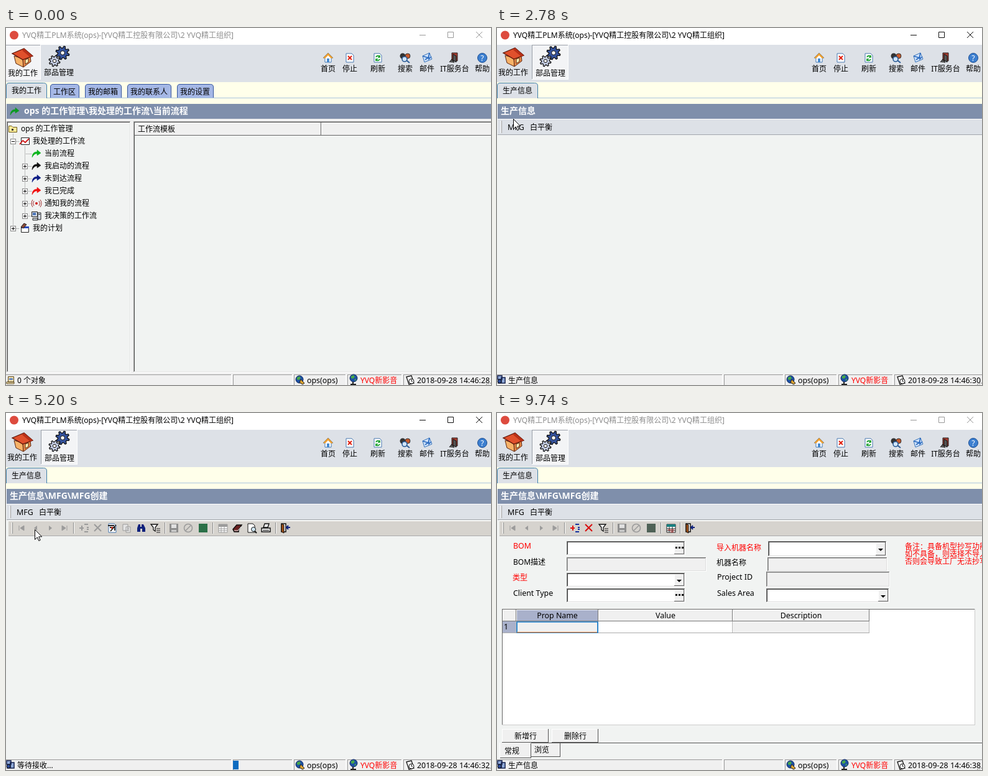
Write an HTML page with a canvas that moves like this. It is 780 px wide and 574 px high and loops after 9.89 s.

```html
<!DOCTYPE html>
<html lang="zh-CN">
<head>
<meta charset="utf-8">
<title>PLM</title>
<style>
html, body { margin: 0; width: 100%; height: 100%; overflow: hidden; background: #fff; }
canvas { display: block; }
</style>
</head>
<body>
<canvas id="stage" width="780" height="574"></canvas>
<script>
const g = document.getElementById('stage').getContext('2d');
const LOOP = 9890, BAR = '#dde1e7', BODY = '#f1f3f2', FACE = '#f0f0f0', RED = '#f00';
const FONT = '"Noto Sans","Noto Sans CJK SC","Noto Sans CJK",sans-serif';

// start, end, steps, from x, y, to x, y
const MOVES = [
  [140, 1070, 13, 632, 568, 79, 72],
  [2390, 2780, 6, 79, 72, 26, 146],
  [2860, 3010, 3, 26, 146, 26, 159],
  [4100, 4480, 6, 26, 159, 46, 187],
  [5720, 5970, 4, 46, 187, 48, 220],
  [6050, 6510, 7, 48, 220, 138, 220],
  [8470, 9420, 13, 138, 220, 656, 580]
];

function rect(x, y, w, h, c) { g.fillStyle = c; g.fillRect(x, y, w, h); }

function bevel(x, y, w, h, tl, br) {
  rect(x, y, w, 1, tl); rect(x, y, 1, h, tl);
  rect(x, y + h - 1, w, 1, br); rect(x + w - 1, y, 1, h, br);
}

function sunk(x, y, w, h) {
  rect(x, y, w, h, BODY);
  bevel(x, y, w, h, '#a0a0a0', '#fff');
  bevel(x + 1, y + 1, w - 2, h - 2, '#555', '#e3e3e3');
}

function text(s, x, y, c = '#000', align = 'left', bold = false) {
  const size = bold ? 14 : /[\u4e00-\u9fff]/.test(s) ? 12 : 12.4;
  g.font = (bold ? 'bold ' : '') + size + 'px ' + FONT;
  g.textAlign = align;
  g.fillStyle = c;
  g.fillText(s, x, y + 5);
}

function path(d, x, y, fill, stroke, lw = 1) {
  const p = new Path2D(d);
  g.save();
  g.translate(x, y);
  if (fill) { g.fillStyle = fill; g.fill(p); }
  if (stroke) { g.strokeStyle = stroke; g.lineWidth = lw; g.stroke(p); }
  g.restore();
}

function disc(x, y, r, fill, stroke, lw = 1) {
  g.beginPath(); g.arc(x, y, r, 0, 7);
  if (fill) { g.fillStyle = fill; g.fill(); }
  if (stroke) { g.strokeStyle = stroke; g.lineWidth = lw; g.stroke(); }
}

function gear(x, y, r, c) {
  g.beginPath();
  for (let i = 0; i < 32; i++) {
    const a = i * Math.PI / 16 + .2, q = i % 4 < 2 ? r : r * .7;
    g.lineTo(x + q * Math.cos(a), y + q * Math.sin(a));
  }
  g.closePath();
  g.fillStyle = c; g.fill();
  g.strokeStyle = '#111'; g.lineWidth = 1.3; g.stroke();
  disc(x, y, r * .3, '#fff', '#111');
}

function page(x, y) { path('M-6-7H3L6-4V7H-6Z', x, y, '#fff', '#4878b0'); }

function titleBar(active) {
  rect(0, 0, 780, 27, '#fff');
  disc(13, 11.5, 7, '#dd4b3e');
  text('YVQ精工PLM系统(ops)-[YVQ精工控股有限公司\\2 YVQ精工组织]', 26, 11, active ? '#000' : '#8c8c8c');
  const c = active ? '#111' : '#999';
  rect(665, 11, 10, 1, c);
  path('M.5.5h9v9h-9Z', 710, 6, null, c);
  path('M0 0L10 10M10 0L0 10', 756, 6, null, c);
}

function bigButton(x, w, on) {
  if (!on) return;
  rect(x, 27, w, 56, on === 2 ? '#f3f4f6' : '#d5d9df');
  bevel(x, 27, w, 56, '#9a9fa8', '#fff');
}

function house(x, y) {
  path('M3 12L17 16L18 30L6 24Z', x, y, '#f6b268', '#5a2410');
  path('M17 16L29 12L30 21L18 30Z', x, y, '#e88a48', '#5a2410');
  path('M0 8L19 0L33 12L17 18Z', x, y, '#e0502c', '#5a1408', 1.3);
  path('M19 0L33 12L29 14L16 3Z', x, y, '#b83018');
  path('M21 18L26 16V22L21 25Z', x, y, '#fff0b0', '#5a2410');
}

function mainBar(t) {
  const parts = t >= 1530;
  rect(0, 27, 780, 60, BAR);
  bigButton(-1, 57, parts ? 0 : 2);
  bigButton(56, 59, parts ? 2 : t >= 1000 ? 1 : 0);
  const d = parts ? 0 : 1;
  house(10, 32 + d);
  text('我的工作', 2 + d, 71 + d);
  gear(91, 40, 11, '#34529c');
  gear(78, 53, 9, '#c4cde4');
  text('部品管理', 61 + (t >= 1000), 71 + (parts || t >= 1000));

  path('M-8 0L0-8L8 0L5 0V7H-5V0Z', 518, 48, '#fff', '#3d77b4');
  path('M-8 0L0-8L8 0L5 1L0-4L-5 1Z', 518, 48, '#f0a030');
  rect(516, 49, 4, 6, '#4a8cd0');
  page(553, 48); path('M-3-2L3 4M3-2L-3 4', 553, 47, null, '#e02010', 2);
  page(598, 48); path('M-3-1C-2-4 2-4 3-2M3 2C2 5-2 5-3 3M3-4V-1H0M-3 5V2H0', 598, 48, null, '#0a9a20', 1.6);
  disc(638, 45, 4.5, '#333'); disc(646, 45, 4, '#c75a2c', '#333');
  disc(641, 50, 4, '#cfe4fa', '#2a5a94', 1.6); path('M0 0L5 4', 644, 52, null, '#2a5a94', 2);
  path('M-7-3L4-8L8 2L-4 7Z', 677, 48, '#cfe2fa', '#3772b8');
  path('M-7-3L2 0L4-8M-3 3L3-1V2L7-2', 677, 48, null, '#2768be', 1.6);
  path('M-4-8H5V5H-4Z', 721, 48, '#a63a2e', '#222');
  path('M-2-6L3-3V7L-2 4ZM-8 7L-4 2L0 8', 721, 48, '#555', '#111');
  disc(766, 48, 7.5, '#3c7fd0', '#1e4f92'); text('?', 766, 48, '#fff', 'center');
  [['首页', 518], ['停止', 553], ['刷新', 598], ['搜索', 642], ['邮件', 677], ['IT服务台', 721.5], ['帮助', 766]]
    .forEach(([s, x]) => text(s, x, 65, '#000', 'center'));
}

function tab(x, w, s, on) {
  const y = on ? 88 : 90, h = 113 - y, r = w - .5;
  path(`M.5 ${h} V5 Q.5 .5 5 .5 H${r - 5} Q${r} .5 ${r} 5 V${h}`, x, y, on ? BAR : '#a5b8e6', on ? '#3f7fa8' : '#34549c');
  text(s, x + Math.floor(w / 2), on ? 100 : 102, '#000', 'center');
}

function tabs(list) {
  rect(0, 87, 780, 35, '#ffffea');
  list.forEach(([x, w, s], i) => { if (i) tab(x, w, s); });
  rect(0, 112, 780, 1, '#a9c4de');
  tab(0, 66, list[0][2], true);
  rect(1, 112, 64, 1, BAR);
}

function heading(s, x) {
  rect(0, 122, 780, 24, '#7f8fab');
  rect(0, 122, 1, 24, '#fff');
  text(s, x, 133, '#fff', 'left', true);
}

function arrow(x, y, c) {
  path('M0 12C0 6 3 3 8 3V0L14 5L8 9V6C5 6 3 7 0 12Z', x, y, c, c, .5);
}

function expander(x, y, plus) {
  rect(x - 4, y - 4, 9, 9, '#fff');
  bevel(x - 4, y - 4, 9, 9, '#888', '#888');
  rect(x - 2, y, 5, 1, '#000');
  if (plus) rect(x, y - 2, 1, 5, '#000');
}

function dots(x, y, w, h) {
  for (let i = 0; i < Math.max(w, h); i += 2) rect(w ? x + i : x, h ? y + i : y, 1, 1, '#888');
}

function workView(t) {
  tabs([[0, 66, '我的工作'], [71, 47, '工作区'], [127, 59, '我的邮箱'], [195, 71, '我的联系人'], [275, 59, '我的设置']]);
  heading('ops 的工作管理\\我处理的工作流\\当前流程', 29);
  arrow(7, 128, '#0a9a20');
  rect(0, 146, 780, 411, FACE);
  sunk(1, 150, 200, 404);
  sunk(205, 150, 580, 404);
  rect(207, 152, 573, 21, FACE);
  bevel(207, 152, 300, 21, '#fff', '#666'); bevel(507, 152, 280, 21, '#fff', '#666');
  text('工作流模板', 212, 162);

  dots(11, 170, 0, 152); dots(30, 190, 0, 112);
  [182, 322].forEach(y => dots(12, y, 10, 0));
  for (let y = 202; y < 303; y += 20) dots(32, y, 9, 0);
  expander(11, 182, false); expander(11, 322, true);
  for (let y = 222; y < 303; y += 20) expander(30, y, true);
  path('M.5 2.5H5l2 2h6.500v8h-13Z', 4, 155, '#ffec9a', '#6c5a14');
  rect(9, 162, 3, 3, '#333');
  path('M2.5.5h13v11h-13Z', 22, 176, '#fff', '#222');
  path('M0 11L5 5L9 8L15 2', 22, 176, null, '#d01818', 1.8);
  ['#0ab41c', '#111', '#0b1c84', '#f01010'].forEach((c, i) => arrow(42, 196 + i * 20, c));
  disc(49, 282, 2, '#d01818');
  path('M-4-4Q-7 0-4 4M4-4Q7 0 4 4M-6-6Q-10 0-6 6M6-6Q10 0 6 6', 49, 282, null, '#a03030');
  path('M.5.5h9v8h-9ZM2 11h8v3H2ZM10 2h5v11h-5Z', 41, 295, '#d4dce8', '#222');
  rect(43, 297, 5, 4, '#4a74b8'); rect(52, 299, 3, 1, '#222');
  path('M2.500 5.500h12v9h-12Z', 22, 314, '#fff', '#222');
  rect(25, 319, 12, 3, '#2a4cc0');
  path('M0 6L5 0L9 2L4 8Z', 24, 314, '#8a4a38', '#222');

  const on = t >= 1300;
  if (on) {
    rect(60, 192, 52, 20, '#0078d7');
    g.setLineDash([1, 1]); path('M.5.5h51v19h-51Z', 60, 192, null, '#f0a060'); g.setLineDash([]);
  }
  text('ops 的工作管理', 24, 161);
  text('我处理的工作流', 43, 181);
  ['当前流程', '我启动的流程', '未到达流程', '我已完成', '通知我的流程', '我决策的工作流']
    .forEach((s, i) => text(s, 62, 201 + i * 20, on && !i ? '#fff' : '#000'));
  text('我的计划', 43, 321);
}

function grip(y, h) { rect(6, y, 1, h, '#fff'); rect(7, y, 1, h, '#9a9a9a'); }

function partsView(t) {
  tabs([[0, 66, '生产信息']]);
  heading(t >= 5030 ? '生产信息\\MFG\\MFG创建' : '生产信息', 6);
  rect(0, 146, 780, 411, BODY);
  rect(1, 146, 779, 26, BAR); rect(1, 171, 779, 1, '#a2a6ac'); rect(1, 146, 779, 1, '#fff');
  grip(149, 20);
  const open = t >= 3400 && t < 5030, hover = t >= 2860 && t < 5030;
  if (hover) bevel(12, 147, 36, 24, open ? '#888' : '#fff', open ? '#fff' : '#888');
  text('MFG', 17 + open, 159 + open);
  text('白平衡', 53, 159);
  if (t >= 5190) tools(t >= 6200);
  if (t >= 5340) form(t);
}

function menu(hot) {
  g.save();
  g.shadowColor = 'rgba(0,0,0,.55)'; g.shadowBlur = 4; g.shadowOffsetX = g.shadowOffsetY = 3;
  rect(12, 172, 159, 49, '#f2f2f2');
  g.restore();
  bevel(12, 172, 159, 49, '#ccc', '#ccc');
  if (hot) rect(15, 174, 153, 22, '#91c9f7');
  text('MFG创建(M)', 47, 185);
  text('MFG修改(I)', 47, 207);
}

const GREY = '#9b9b9b';
const ICONS = {
  first: x => path('M-4-4V4M4-4V4L-2 0Z', x, 185, GREY, GREY),
  prev: x => path('M2-4V4L-3 0Z', x, 185, GREY),
  next: x => path('M-2-4V4L3 0Z', x, 185, GREY),
  last: x => path('M4-4V4M-4-4V4L2 0Z', x, 185, GREY, GREY),
  add(x, on) {
    path('M-7 0H0M-3-4V4', x, 185, null, on ? '#e01010' : GREY, 2);
    path('M1-6H7M1 6H7M5-1H8M5 2H8', x, 185, null, on ? '#1530a0' : GREY, 2);
  },
  del: (x, on) => path('M-5-5L6 6M6-5L-5 6', x, 184, null, on ? '#d80c0c' : GREY, 2),
  edit(x) { page(x, 185); path('M-7-4H3M-3 5L6-5M-4-1H4V4', x, 185, null, '#222', 1.8); rect(x - 2, 183, 3, 3, '#c03020'); },
  copy: x => path('M-6-6H2V4H-6ZM-1-2H6V7H-1ZM1 1H4M1 4H4', x, 185, '#e4e4e4', GREY),
  find: x => path('M-6 6V0L-4-6H-1V-2H1V-6H4L7 0V6H2V1H-1V6Z', x, 185, '#10227c'),
  filter(x) { path('M-7-6H4L0-1V5L-3 3V-1Z', x, 185, '#fff', '#111', 1.3); path('M2 1H8M2 4H8M2 7H8', x, 185, null, '#222', 1.2); },
  save(x) { rect(x - 7, 178, 14, 14, '#8e8e8e'); rect(x - 4, 179, 8, 6, '#e0e0e0'); rect(x - 4, 188, 8, 3, '#ccc'); },
  stop(x) { disc(x, 185, 6.5, null, GREY, 1.6); path('M-4 4L4-4', x, 185, null, GREY, 1.6); },
  sheet: (x, on) => rect(x - 7, 178, 14, 14, on ? '#4f6257' : '#2b7048'),
  table(x, on) {
    path('M-7-6H7V7H-7ZM-7 1H7M-7 4H7M-3-2V7M2-2V7', x, 185, '#fff', on ? '#222' : GREY);
    rect(x - 7, 179, 14, 4, on ? '#188080' : GREY);
    if (on) path('M-5 3H5M-1 6H4', x, 185, null, '#d02020');
  },
  book(x) { path('M-7 2L-1-5H7L2 3V6H-5Z', x, 185, '#6a2020', '#111', 1.5); path('M-5 4H1L6-2', x, 185, null, '#fff'); },
  view(x) { path('M-6-7H2L5-4V7H-6Z', x, 185, '#fff', '#111'); disc(x + 3, 187, 3.5, '#cfe6f4', '#111'); path('M0 0L3 3', x + 5, 190, null, '#111', 2); },
  print(x) { path('M-4-1L-2-7H5L3-1ZM-7 0H7V6H-7Z', x, 185, '#eee', '#111', 1.4); rect(x - 5, 188, 10, 1, '#111'); },
  exit(x) { path('M-6-7H1V6H-6Z', x, 185, '#fff', '#111', 1.5); path('M-6-7L-2-5V8L-6 6Z', x, 185, '#a05018', '#111'); path('M8-1H3M5-4L2-1L5 2', x, 185, null, '#10227c', 2); }
};
const NAV = 'first:25 prev:48 next:71 last:94 -:108 add:125 del:147 ';
const BUSY = NAV + 'edit:171 copy:194 find:217 filter:240 -:255 save:270 stop:293 sheet:317 -:332 table:349 book:372 view:395 print:418 -:433 exit:449';
const READY = NAV + 'filter:171 -:186 save:201 stop:224 sheet:248 -:263 table:280 -:294 exit:310';

function tools(ready) {
  rect(4, 173, 776, 25, '#d6d3ce');
  rect(4, 197, 776, 1, '#aaa'); rect(4, 173, 776, 1, '#fff');
  rect(9, 176, 1, 18, '#fff'); rect(10, 176, 1, 18, '#888');
  for (const item of (ready ? READY : BUSY).split(' ')) {
    const [name, pos] = item.split(':');
    if (name === '-') { rect(+pos, 176, 1, 18, '#888'); rect(+pos + 1, 176, 1, 18, '#fff'); }
    else ICONS[name](+pos, ready);
  }
}

function field(x, y, w, h, bg, kind) {
  rect(x, y, w, h, bg);
  bevel(x, y, w, h, '#777', '#fff');
  bevel(x + 1, y + 1, w - 2, h - 2, bg === FACE ? '#aaa' : '#444', '#ddd');
  if (!kind) return;
  const bx = x + w - 18, cy = y + (h >> 1);
  rect(bx, y + 2, 16, h - 4, FACE);
  bevel(bx, y + 2, 16, h - 4, '#fff', '#666');
  if (kind === 'drop') path('M-4-1H4L0 3Z', bx + 8, cy + 1, '#000');
  else for (let i = 0; i < 3; i++) rect(bx + 2 + i * 5, cy - 2, 3, 3, '#000');
}

function form(t) {
  const ready = t >= 6200;
  text('BOM', 26, 213, RED); text('BOM描述', 26, 239); text('类型', 25, 264, RED); text('Client Type', 26, 289);
  field(112, 206, 191, 23, '#fff', 'more');
  field(112, 232, 225, 23, FACE);
  field(112, 257, 191, 23, '#fff', 'drop');
  field(112, 282, 191, 23, '#fff', 'more');
  text('导入机器名称', 353, 216, RED); text('机器名称', 353, 240); text('Project ID', 354, 263); text('Sales Area', 354, 289);
  field(436, 206, 191, 25, '#fff', 'drop');
  field(435, 232, 193, 23, FACE);
  field(433, 255, 199, 25, FACE);
  field(433, 282, 198, 23, ready ? '#fff' : FACE, 'drop');
  text('备注：具备机型抄写功能', 656, 214, RED);
  text('如不具备，则选择不导入', 656, 226, RED);
  text('否则会导致工厂无法抄写', 656, 238, RED);
  // caret blinks every 550 ms once the field has focus
  const lit = t >= 6510 && t < 9650 && (t < 7690 || Math.floor((t - 7690) / 550) % 2);
  if (lit) rect(115, 208, 1, 17, '#000');

  rect(8, 315, 761, 187, '#fff'); bevel(8, 315, 761, 187, '#666', '#ccc');
  [[9, 22, ''], [31, 132, 'Prop Name'], [163, 216, 'Value'], [379, 220, 'Description']].forEach(([x, w, s], i) => {
    rect(x, 316, w, 19, i === 1 ? '#a9b1cb' : FACE);
    bevel(x, 316, w, 19, '#fff', '#777');
    text(s, x + w / 2, 325, '#000', 'center');
    rect(x, 335, w, 19, ['#a9b1cb', FACE, '#fff', FACE][i]);
    rect(x + w - 1, 335, 1, 19, '#bbb'); rect(x, 353, w, 1, '#aaa');
  });
  text('1', 11, 343);
  path('M1 1h130v17h-130Z', 31, 335, null, ready ? '#1478c8' : '#181878', 1.7);
  if (ready) rect(32, 352, 129, 1, '#e07020');

  [[8, '新增行'], [88, '删除行']].forEach(([x, s]) => {
    rect(x, 508, 75, 22, FACE); bevel(x, 508, 75, 22, '#fff', '#555');
    text(s, x + 38, 519, '#000', 'center');
  });
  rect(4, 530, 776, 1, '#555');
  rect(54, 531, 48, 22, FACE); bevel(54, 530, 48, 23, '#555', '#555');
  rect(5, 530, 50, 25, FACE);
  rect(5, 554, 50, 1, '#555'); rect(54, 531, 1, 24, '#555'); rect(4, 530, 1, 24, '#fff');
  text('常规', 12, 543); text('浏览', 60, 541);
}

function globe(x, y) {
  disc(x, y, 6, '#1c50a4', '#112a60');
  path('M-4-3L0-5L2-2L-1 1L-4 0ZM1 2L4 1L3 5Z', x, y, '#48a848');
}

function statusBar(t) {
  rect(0, 556, 780, 18, FACE);
  [[-1, 364], [365, 96], [463, 84], [549, 88], [639, 150]].forEach(([x, w]) => bevel(x, 557, w, 22, '#999', '#fff'));
  const busy = t >= 5030 && t < 6200;
  if (t < 1530) {
    path('M3.500 1.500h9v9h-9ZM1 10h12v3H1Z', 0, 559, '#f2dfae', '#5a4820');
    rect(5, 563, 6, 3, '#688ac0');
  } else {
    path('M1 1h7v6h-7ZM7 4h6v9h-6ZM2 10h5v3h-5Z', 0, 558, '#8fa9d8', '#15204c', 1.5);
    disc(4, 568, 3, '#2a4a9a', '#111');
  }
  text(t < 1530 ? '0 个对象' : busy ? '等待接收...' : '生产信息', 18, 566);
  if (busy) rect(365, 559, 9, 14, '#0f6cc0');
  globe(472, 565);
  path('M2-1L8 5L5 7L0 4Z', 472, 566, '#d8a030', '#222');
  text('ops(ops)', 484, 566);
  globe(559, 563);
  path('M-1 6V9M-5 10H4', 559, 563, null, '#222', 2);
  text('YVQ新影音', 570, 566, RED);
  path('M-6-5L2-7L6 5L-2 7Z', 650, 566, '#fff', '#111', 1.3);
  disc(652, 568, 4, '#fff', '#111'); path('M0-3V0H2', 652, 568, null, '#111');
  const sec = t < 1680 ? 28 : t < 3720 ? 30 : t < 5720 ? 32 : t < 7690 ? 34 : t < 9650 ? 36 : 38;
  text('2018-09-28 14:46:' + sec, 661, 566);
  for (let i = 0; i < 3; i++) rect(778 - i * 3, 570 + i, 2, 2, '#bbb');
}

function pointer(t) {
  let x, y;
  for (const [t0, t1, n, x0, y0, x1, y1] of MOVES) {
    if (t < t0) break;
    const k = Math.min(n, Math.floor((t - t0) * (n - 1) / (t1 - t0) + .02) + 1) / n;
    const e = k * k * (3 - 2 * k);
    x = Math.round(x0 + (x1 - x0) * e);
    y = Math.round(y0 + (y1 - y0) * e);
  }
  return { x, y };
}

function drawPointer({ x, y }, t) {
  if (t < 140 || t >= 9420) return;
  if (t > 6000 && x > 112 && x < 285 && y > 206 && y < 229)
    path('M-3-7.500H-1M1-7.500H3M.5-7V7M-3 7.500H-1M1 7.500H3', x, y, null, '#000');
  else
    path('M.5.5V16.500L4.300 12.800L6.800 18.500L9.200 17.400L6.700 11.900H11.600Z', x, y, '#fff', '#000');
}

function frame(t) {
  g.clearRect(0, 0, 780, 574);
  titleBar(t >= 1300 && t < 9650);
  mainBar(t);
  if (t < 1530) workView(t); else partsView(t);
  statusBar(t);
  const p = pointer(t);
  if (t >= 3400 && t < 5030) menu(p.y > 173);
  drawPointer(p, t);
}

const start = performance.now();
function tick() {
  frame((performance.now() - start) % LOOP);
  requestAnimationFrame(tick);
}
tick();
</script>
</body>
</html>
```
